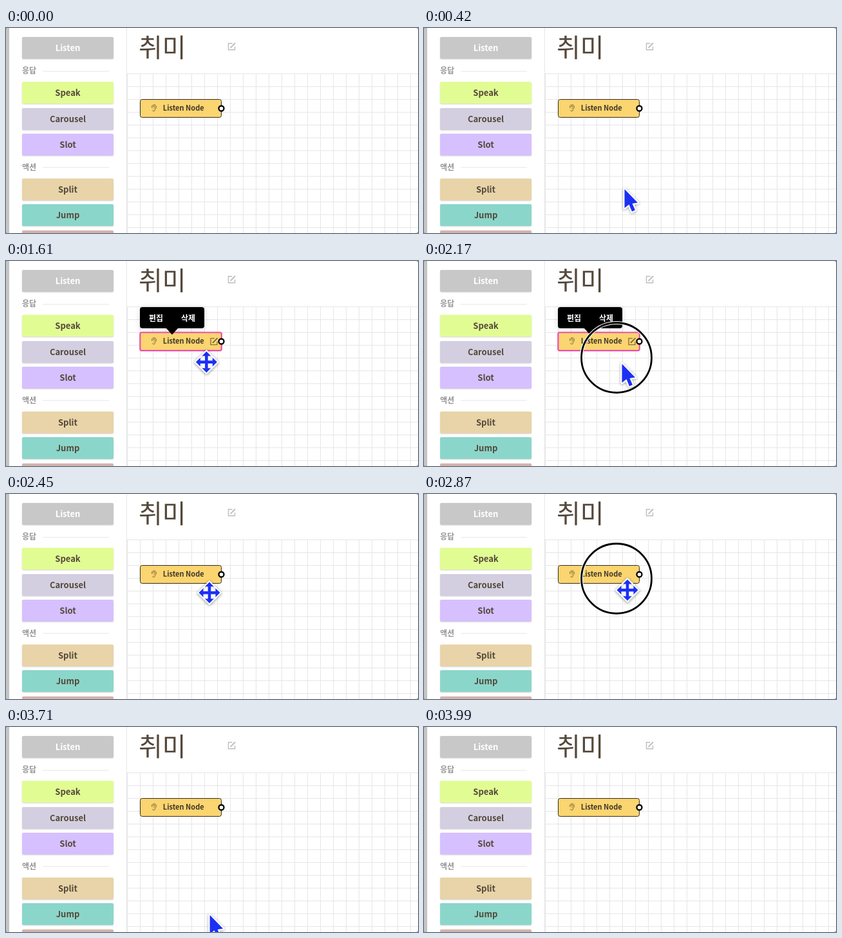
These frames come from a looping animation (640 by 320 pixels, 4340 ms). An HTML page with a canvas:

```html
<!DOCTYPE html>
<html lang="ko">
<head>
<meta charset="utf-8">
<title>Node editor</title>
<style>
html, body { margin: 0; width: 100%; height: 100%; overflow: hidden; background: #fff; }
canvas { display: block; width: 640px; height: 320px; }
</style>
</head>
<body>
<canvas id="stage" width="640" height="320"></canvas>
<script>
const ctx = document.getElementById('stage').getContext('2d');
const LOOP = 4340, STEP = 70, CELL = 20;
const FONT = '"Noto Sans CJK KR", "Noto Sans CJK", "Noto Sans", sans-serif';
const INK = '#54483a', BLUE = '#1c30f4';

const ENTRY = { x: 377, y: 370 };
const MOVES = [
  { from: 140, to: 350, x: 303, y: 242 },
  { from: 630, to: 1120, x: 290, y: 129 },
  { from: 1540, to: 1890, x: 299, y: 151 },
  { from: 2310, to: 2660, x: 299, y: 132 },
  { from: 3220, to: 3360, x: 299, y: 151 },
  { from: 3570, to: 3990, x: 312, y: 340 }
];
// Every click toggles the selection one step later
const CLICKS = [1260, 2170, 2870, 3430];
const RING_LIFE = 2 * STEP;

const SECTIONS = [
  { title: '응답', y: 67, items: { Speak: '#e2fc94', Carousel: '#d3cfe0', Slot: '#d6c0ff' } },
  { title: '액션', y: 217.5, items: { Split: '#e8d4a8', Jump: '#8bd6ca', '': '#d3b3ac' } }
];

function rect(x, y, w, h, color) {
  ctx.fillStyle = color;
  ctx.fillRect(x, y, w, h);
}

function box(x, y, w, h, r, fill, stroke, width) {
  ctx.beginPath();
  ctx.roundRect(x, y, w, h, r);
  ctx.fillStyle = fill;
  ctx.fill();
  if (stroke) outline(stroke, width);
}

function outline(color, width) {
  ctx.strokeStyle = color;
  ctx.lineWidth = width;
  ctx.stroke();
}

function circle(x, y, r) {
  ctx.beginPath();
  ctx.arc(x, y, r, 0, Math.PI * 2);
}

function polygon(...points) {
  ctx.beginPath();
  points.forEach(([x, y]) => ctx.lineTo(x, y));
  ctx.closePath();
}

function text(str, x, y, size, color, align = 'left', weight = 'bold') {
  ctx.font = `${weight} ${size}px ${FONT}`;
  ctx.textAlign = align;
  ctx.fillStyle = color;
  ctx.fillText(str, x, y);
}

function at(x, y, draw) {
  ctx.save();
  ctx.translate(x, y);
  draw();
  ctx.restore();
}

function withShadow(alpha, blur, dy, draw) {
  ctx.save();
  ctx.shadowColor = `rgba(0,0,0,${alpha})`;
  ctx.shadowBlur = blur;
  ctx.shadowOffsetY = dy;
  draw();
  ctx.restore();
}

function editIcon(x, y, color, width) {
  at(x, y, () => {
    ctx.beginPath();
    ctx.moveTo(7, 1.5);
    ctx.lineTo(1, 1.5);
    ctx.lineTo(1, 11.5);
    ctx.lineTo(11, 11.5);
    ctx.lineTo(11, 6.5);
    outline(color, width);
    ctx.beginPath();
    ctx.moveTo(4, 8.6);
    ctx.lineTo(11.5, 1);
    outline(color, width * 1.4);
  });
}

function earIcon(x, y) {
  at(x, y, () => {
    ctx.beginPath();
    ctx.arc(0, 0, 3.5, Math.PI * 0.85, Math.PI * 2.2);
    ctx.quadraticCurveTo(1.4, 3.5, 1.2, 5);
    ctx.arc(-0.5, 5, 1.7, 0, Math.PI);
    ctx.moveTo(-1.6, 0.5);
    ctx.arc(0, 0, 1.6, Math.PI, Math.PI * 2.3);
    ctx.lineTo(-0.8, 3.2);
    outline('#7d683c', 1);
  });
}

function drawButton(label, y, fill, color = INK) {
  withShadow(0.18, 2, 1, () => box(25, y, 142, 34, 2, fill));
  text(label, 96, y + 21.7, 13, color, 'center');
}

function drawSidebar() {
  rect(0, 0, 5, 320, '#c4c4c4');
  rect(187, 0, 1, 320, '#e6e6e6');
  drawButton('Listen', 14, '#c8c8c8', '#fff');
  for (const { title, y, items } of SECTIONS) {
    text(title, 25, y + 4.3, 12, '#949494');
    rect(57, Math.floor(y), 103, 1, '#e8e8e8');
    Object.entries(items).forEach(([label, fill], i) =>
      drawButton(label, Math.round(y + 17.3 + 40.5 * i), fill));
  }
}

function drawBoard() {
  for (let x = 188; x < 640; x += CELL) rect(x, 71, 1, 249, '#e6e6e6');
  for (let y = 71; y < 320; y += CELL) rect(188, y, 452, 1, '#e6e6e6');
  text('취미', 206, 44.5, 40, INK, 'left', 300);
  editIcon(344.5, 22.5, '#bdbdbd', 1.4);
}

function drawNode(selected) {
  if (selected) box(208.3, 111.5, 126.5, 28.3, 2.5, '#fad570', '#e84fb0', 2.2);
  else box(208.5, 111.5, 126, 28, 3, '#fad570', '#302a20', 1);
  earIcon(230, 123.2);
  text('Listen Node', 243.8, 129, 11, '#40372a');
  if (selected) editIcon(317, 119.3, '#6b5930', 1.1);
  circle(334.5, 125.5, 4);
  ctx.fillStyle = '#fff';
  ctx.fill();
  outline('#000', 2.3);
}

function drawMenu() {
  withShadow(0.15, 10, 1, () => box(208, 72, 100, 33, 4, '#000'));
  polygon([248, 104], [268, 104], [258, 115]);
  ctx.fillStyle = '#000';
  ctx.fill();
  text('편집', 233, 93.5, 12, '#fff', 'center');
  text('삭제', 283, 93.5, 12, '#fff', 'center');
}

function drawRing(x, y, r) {
  circle(x, y, r);
  outline('#fff', 5);
  outline('#000', 2.8);
}

function drawArrow() {
  polygon([0, 0], [0, 29.5], [7, 24], [11.5, 35], [16.5, 32.7], [12, 22.5], [20.5, 21.3]);
  withShadow(0.35, 4, 1, () => outline('#fff', 4.5));
  ctx.fillStyle = BLUE;
  ctx.fill();
}

function drawMoveCross() {
  polygon([0, -18], [18, 0], [0, 18], [-18, 0]);
  ctx.fillStyle = '#fff';
  withShadow(0.35, 4, 1, () => { ctx.fill(); outline('#fff', 2); });
  ctx.fillStyle = BLUE;
  for (let i = 0; i < 4; i++) {
    polygon([0, -16.5], [6.8, -9.5], [-6.8, -9.5]);
    ctx.fill();
    ctx.fillRect(-2.3, -10, 4.6, 10);
    ctx.rotate(Math.PI / 2);
  }
}

function pointerAt(t) {
  let { x, y } = ENTRY;
  for (const move of MOVES) {
    const p = Math.min(1, Math.max(0, (t - move.from) / (move.to - move.from)));
    const eased = 1 - (1 - p) ** 3;
    x += (move.x - x) * eased;
    y += (move.y - y) * eased;
  }
  return { x, y };
}

function drawPointer(t) {
  const { x, y } = pointerAt(t);
  const age = t - CLICKS.findLast(start => start <= t);
  if (age < RING_LIFE) drawRing(x, y, 54.5 * (1 - age / RING_LIFE));
  ctx.lineJoin = 'round';
  if (y < 140) at(x + 17, y + 18, drawMoveCross);
  else at(x + 8.5, y + 9.5, drawArrow);
}

function render(t) {
  const selected = CLICKS.filter(start => start + STEP <= t).length % 2 === 1;
  rect(0, 0, 640, 320, '#777');
  ctx.save();
  ctx.beginPath();
  ctx.roundRect(0, 0, 640, 320, 3);
  ctx.clip();
  rect(0, 0, 640, 320, '#fff');
  drawSidebar();
  drawBoard();
  drawNode(selected);
  if (selected) drawMenu();
  drawPointer(t);
  ctx.restore();
}

const started = performance.now();
function tick() {
  const t = (performance.now() - started) % LOOP;
  render(Math.floor(t / STEP) * STEP);
  requestAnimationFrame(tick);
}
tick();
</script>
</body>
</html>
```
